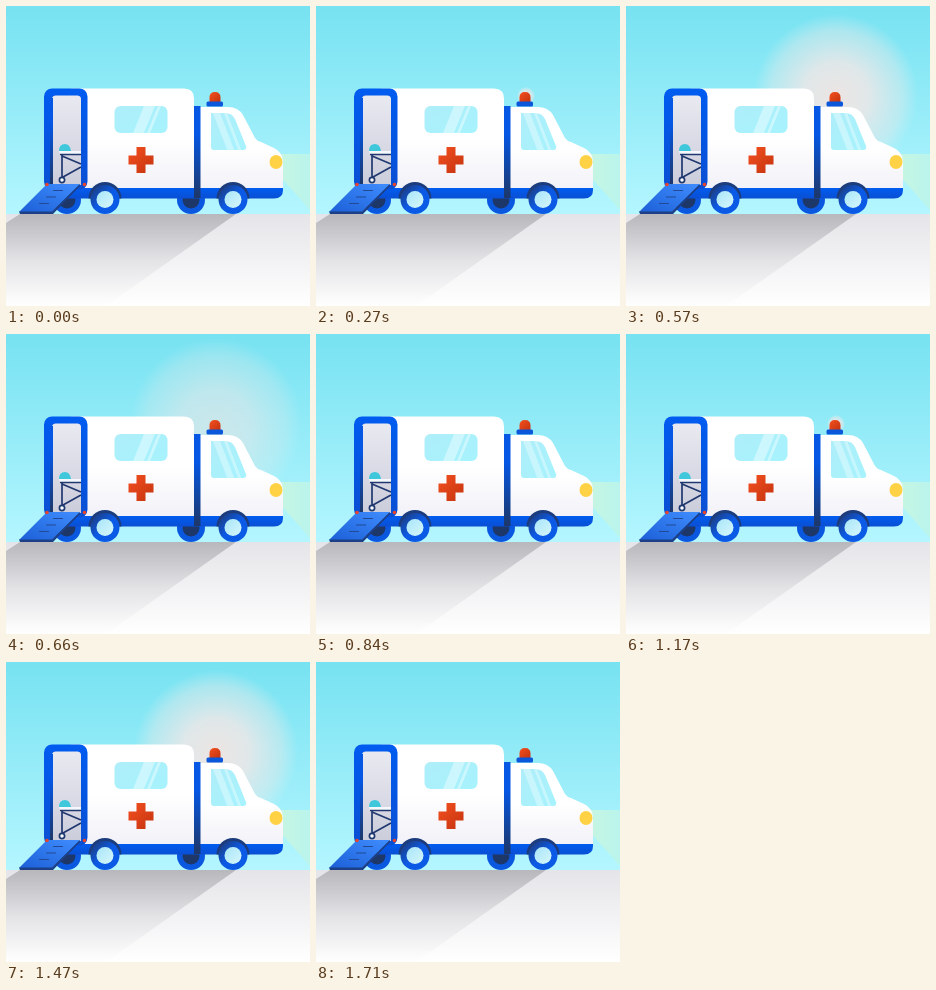
Recreate the animation shown at these times as an HTML page. Size 304 by 300 pixels, loop 1800 ms.

```html
<!DOCTYPE html>
<html lang="en">
<head>
<meta charset="utf-8">
<title>Ambulance</title>
<style>
html, body { margin: 0; height: 100%; overflow: hidden; }
svg { display: block; width: 100vw; height: 100vh; }
</style>
</head>
<body>
<svg viewBox="0 0 304 300" preserveAspectRatio="none">
<defs>
  <linearGradient id="sky" x2="0" y2="1">
    <stop stop-color="#77e2f1"/><stop offset="1" stop-color="#b4f6ff"/>
  </linearGradient>
  <linearGradient id="ground" x2="0" y2="1">
    <stop stop-color="#e5e5e9"/><stop offset="1" stop-color="#fff"/>
  </linearGradient>
  <linearGradient id="shade" x2="0" y2="1">
    <stop stop-color="#b7b7bc"/><stop offset=".5" stop-color="#e3e3e6"/><stop offset="1" stop-color="#fff"/>
  </linearGradient>
  <linearGradient id="beam">
    <stop stop-color="#c9f6e0"/><stop offset="1" stop-color="#b9f4ec"/>
  </linearGradient>
  <radialGradient id="halo">
    <stop stop-color="#f4e4e1"/><stop offset=".4" stop-color="#efe7e7" stop-opacity=".92"/>
    <stop offset=".8" stop-color="#e3e9ea" stop-opacity=".5"/><stop offset="1" stop-color="#dfeef0" stop-opacity="0"/>
  </radialGradient>
  <linearGradient id="body" x2="0" y2="1">
    <stop offset=".5" stop-color="#fff"/><stop offset="1" stop-color="#f1f1f8"/>
  </linearGradient>
  <linearGradient id="blue" x2="0" y2="1">
    <stop stop-color="#005cf0"/><stop offset="1" stop-color="#0a4fd3"/>
  </linearGradient>
  <linearGradient id="deep" x2="0" y2="1">
    <stop offset=".3" stop-color="#0557e4"/><stop offset="1" stop-color="#1d3768"/>
  </linearGradient>
  <linearGradient id="inside" x2="0" y2="1">
    <stop stop-color="#e9e9f1"/><stop offset="1" stop-color="#cccddb"/>
  </linearGradient>
  <linearGradient id="glass" x2="1" y2="1">
    <stop stop-color="#aeeef9"/><stop offset="1" stop-color="#a6f3fe"/>
  </linearGradient>
  <linearGradient id="red" x2="1" y2="1">
    <stop stop-color="#f4501f"/><stop offset="1" stop-color="#c4330f"/>
  </linearGradient>
  <linearGradient id="tyre" x2="1" y2="1">
    <stop offset=".1" stop-color="#1b3f86"/><stop offset=".5" stop-color="#0b5ae6"/>
  </linearGradient>
  <linearGradient id="hub" x2="1" y2="1">
    <stop stop-color="#a9e6f8"/><stop offset="1" stop-color="#d5f6fd"/>
  </linearGradient>
  <linearGradient id="ramp" x1="1" x2="0" y2="1">
    <stop stop-color="#3f8dff"/><stop offset="1" stop-color="#1c5fd6"/>
  </linearGradient>
  <clipPath id="side"><rect x="108.500" y="100" width="53" height="27" rx="6"/></clipPath>
  <clipPath id="front"><path d="M205 107H219Q226 107 229 113L240 140Q241 144 237 144H208Q205 144 205 141Z"/></clipPath>
  <g id="wheel">
    <path d="M-16.500 -1A16.500 16.500 0 0 1 16.500 -1Z" fill="#1d3c7c"/>
    <circle r="14.500" fill="url(#tyre)"/>
    <circle r="8.500" fill="url(#hub)"/>
  </g>
  <g id="far">
    <circle r="14" fill="#0b58e0"/>
    <circle r="8.500" fill="#1d3768"/>
  </g>
</defs>

<rect width="304" height="208" fill="url(#sky)"/>
<circle id="glow" cx="210" cy="90" fill="url(#halo)"/>
<path d="M268 148H304V204L272 168Z" fill="url(#beam)"/>
<rect y="208" width="304" height="92" fill="url(#ground)"/>
<path d="M14 208H230L100 300H0V217Z" fill="url(#shade)"/>

<use href="#far" x="61" y="194"/>
<use href="#far" x="185" y="194"/>

<path d="M65 82.500H178Q188 82.500 188 92.500V183H65Z" fill="url(#body)"/>
<path d="M194 101H222Q232 101 237 109L249 132Q251 135 255 136L268 142Q277 146 277 157V184H194Z" fill="url(#body)"/>
<path d="M38 182H277V184Q277 192.500 268 192.500H44Q38 192.500 38 187Z" fill="url(#blue)"/>
<path d="M188 100H194.500V192H188Z" fill="url(#deep)"/>

<rect x="38" y="82.500" width="43.500" height="101" rx="8" fill="url(#blue)"/>
<path d="M46 179V93Q46 89.500 50 89.500H71Q75 89.500 75 93V179Z" fill="url(#inside)"/>
<path d="M44 179V92H47V179Z" fill="url(#deep)"/>
<path d="M53 145Q53 138 59 138Q64 138 65 145Z" fill="#3fc8dc"/>
<path d="M53 145H75V148H54Z" fill="#f4f8fc"/>
<g fill="none" stroke="#20386f" stroke-width="1.700">
  <path d="M54 148.500H75M56 149V171M56 150L75 158M57 171L75 161"/>
  <circle cx="56" cy="174" r="2.600" fill="#fff"/>
</g>

<path d="M41 178H74L46 206H13Z" fill="url(#ramp)"/>
<path d="M13 205.500H46L74 178V180L47 208H14Z" fill="#1d3f86"/>
<path d="M47 184.500H57M40 191H50M33 197.500H43" stroke="#234a96" stroke-width="1.200"/>
<g fill="#e8452c"><circle cx="41" cy="178.500" r="1.800"/><circle cx="78.500" cy="178.500" r="1.800"/></g>

<g clip-path="url(#side)">
  <path d="M108 100H162V127H108Z" fill="url(#glass)"/>
  <path d="M138 100H149L138 127H127ZM152 100H155L144 127H141Z" fill="#fff" opacity=".4"/>
</g>
<g clip-path="url(#front)">
  <path d="M204 106H243V147H204Z" fill="url(#glass)"/>
  <path d="M207 107H214L229 146H222ZM218 107H221L236 146H233Z" fill="#fff" opacity=".35"/>
</g>
<path d="M130.500 141H139.500V149.500H147.500V158.500H139.500V167H130.500V158.500H122.500V149.500H130.500Z" fill="url(#red)"/>
<ellipse cx="270" cy="156" rx="6.500" ry="7" fill="#ffd245"/>

<path d="M203.500 96V91.500Q203.500 86 209 86Q214.500 86 214.500 91.500V96Z" fill="url(#red)"/>
<rect x="200.500" y="95.500" width="16.500" height="5" rx="1.500" fill="#0b57dc"/>

<use href="#wheel" x="99" y="193.500"/>
<use href="#wheel" x="227" y="193.500"/>
</svg>
<script>
const glow = document.getElementById("glow");
const clamp = v => Math.max(0, Math.min(1, v));
const smooth = v => v * v * (3 - 2 * v);

function draw(now) {
  const t = now % 900;
  glow.setAttribute("r", 86 * smooth(clamp((t - 180) / 450)));
  glow.setAttribute("opacity", clamp((810 - t) / 260));
  requestAnimationFrame(draw);
}
requestAnimationFrame(draw);
</script>
</body>
</html>
```
